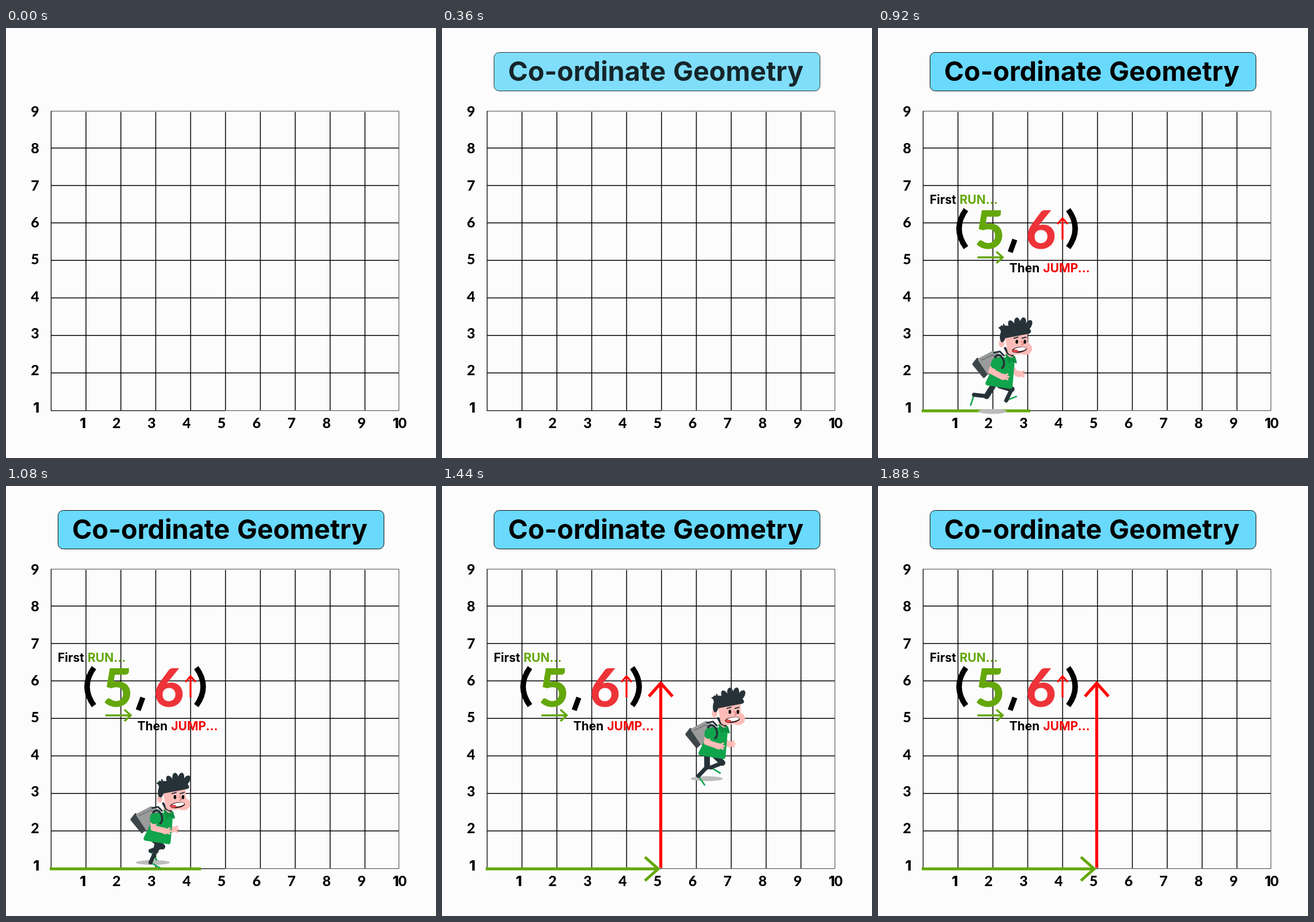
These frames come from a looping animation (748x748 px, 2.6 s). An HTML page with a canvas:

```html
<!DOCTYPE html>
<html lang="en">
<head>
<meta charset="utf-8">
<title>Co-ordinate Geometry</title>
<style>
html, body { margin: 0; width: 100%; height: 100%; overflow: hidden; background: #fcfcfc; }
canvas { display: block; width: 100vw; height: 100vh; }
</style>
</head>
<body>
<canvas id="stage" width="748" height="748"></canvas>
<script>
const SIZE = 748, LOOP = 2600, STEP = 40;
const GREEN = '#64a70b', RED = '#fd0808', DARK = '#263238', SKIN = '#fdbcb8', SHIRT = '#10a44c';
const view = document.getElementById('stage').getContext('2d');
const layer = document.createElement('canvas');
layer.width = layer.height = SIZE;
const boyCtx = layer.getContext('2d');
let c = view;

const { sin, cos, hypot, sqrt, max, min, floor, PI } = Math;
const ramp = (t, from, to) => max(0, min(1, (t - from) / (to - from)));
const ease = (t, from, to) => (1 - cos(PI * ramp(t, from, to))) / 2;

// ---- drawing helpers ----
function trace(pts) {
  c.beginPath();
  pts.forEach(p => c.lineTo(p[0], p[1]));
}

function line(pts, color, width, ends = 'butt') {
  trace(pts);
  c.strokeStyle = color;
  c.lineWidth = width;
  c.lineCap = ends;
  c.lineJoin = ends === 'round' ? 'round' : 'miter';
  c.stroke();
}

// filled polygon with corners rounded outwards by r
function soft(pts, color, r) {
  trace(pts);
  c.closePath();
  c.fillStyle = c.strokeStyle = color;
  c.lineWidth = 2 * r;
  c.lineJoin = 'round';
  c.fill();
  c.stroke();
}

function oval(x, y, rx, ry, color, turn = 0) {
  c.beginPath();
  c.ellipse(x, y, rx, ry, turn, 0, PI * 2);
  c.fillStyle = color;
  c.fill();
}

// shaft plus open head, pointing along (dx, dy)
function arrow(x, y, dx, dy, length, width, back, side, color) {
  const at = (along, across) => [x + dx * along - dy * across, y + dy * along + dx * across];
  line([at(0, 0), at(length - 1, 0)], color, width);
  line([at(length - back, -side), at(length, 0), at(length - back, side)], color, width);
}

function text(str, x, y, size, color = '#000') {
  c.font = `700 ${size}px Inter, sans-serif`;
  c.fillStyle = color;
  c.fillText(str, x, y);
}

// one digit, its ink ending at `right` and centred on y
function digit(ch, right, y, size = 25, color = '#000') {
  c.font = `800 ${size}px ${ch === '1' ? 'Inter' : 'Lato'}, sans-serif`;
  c.fillStyle = color;
  const m = c.measureText(ch);
  c.fillText(ch, right - m.actualBoundingBoxRight,
    y + (m.actualBoundingBoxAscent - m.actualBoundingBoxDescent) / 2);
}

// ---- scene ----
function grid() {
  for (let i = 1; i < 10; i++) {
    const x = 78.5 + i * 60.66;
    line([[x, 146], [x, 665]], '#000', 1.5);
  }
  for (let i = 1; i < 8; i++) {
    const y = 143.4 + i * 65.24;
    line([[79, y], [683, y]], '#000', 1.5);
  }
  line([[78, 144.7], [683.5, 144.7], [683.5, 665.6], [78, 665.6]], '#444', 1);
  line([[78.5, 144.5], [78.5, 665.6], [381, 665.6]], '#111', 1.4);

  for (let n = 1; n <= 9; n++) {
    digit(String(n), 57.3, 724 - n * 64.35);
    digit(String(n), 77.3 + n * 60.9, 687);
  }
  digit('1', 682.5, 687);
  digit('0', 696.5, 687);
}

function title() {
  c.beginPath();
  c.roundRect(90.5, 42.5, 567, 67, 9);
  c.fillStyle = '#69d9fc';
  c.fill();
  c.strokeStyle = '#111';
  c.lineWidth = 1;
  c.stroke();
  text('Co-ordinate', 115, 92, 46.7);
  text('Geometry', 402, 92, 46.7);
}

function bracket(x, bend) {
  c.beginPath();
  c.moveTo(x, 316);
  c.quadraticCurveTo(x + bend, 349, x, 382);
  c.strokeStyle = '#000';
  c.lineWidth = 9.5;
  c.lineCap = 'butt';
  c.stroke();
}

function pair() {
  text('First', 90, 305.5, 21);
  text('RUN...', 142, 305.5, 21, GREEN);
  text('Then', 228.5, 425, 21);
  text('JUMP...', 287.3, 425, 21, '#f30505');
  bracket(153, -24);
  bracket(331, 24);
  digit('5', 217, 350.5, 91, GREEN);
  line([[238, 368], [230, 390]], '#000', 9);
  digit('6', 308, 350.5, 91, '#ee3338');
  arrow(173, 399, 1, 0, 44, 3.5, 11, 10, GREEN);
  arrow(321, 368, 0, -1, 37, 3.3, 10, 9, RED);
}

function wipe(x, y, w, h, draw) {
  c.save();
  c.beginPath();
  c.rect(x, y, w, h);
  c.clip();
  draw();
  c.restore();
}

function arrows(t) {
  const run = 310 * ramp(t, 500, 1168), jump = 330 * ramp(t, 1116, 1275);
  wipe(340, 664 - jump, 80, jump, () => arrow(380.5, 664, 0, -1, 321, 5.3, 23, 20.5, RED));
  wipe(70, 630, run, 70, () => arrow(76, 666, 1, 0, 300, 5, 23, 20.5, GREEN));
}

// ---- runner ----
const ROUTE = [[680, 129], [920, 199], [1240, 329], [1640, 611], [1840, 784]];

// smooth curve through the route's points
function routeX(t) {
  const last = ROUTE.length - 1;
  let i = 0;
  while (i < last - 1 && t >= ROUTE[i + 1][0]) i++;
  const slope = k => {
    const p = ROUTE[max(0, k - 1)], q = ROUTE[min(last, k + 1)];
    return (q[1] - p[1]) / (q[0] - p[0]);
  };
  const [t0, a] = ROUTE[i], [t1, b] = ROUTE[i + 1];
  const s = (t - t0) / (t1 - t0), r = 1 - s;
  return a * r * r * (1 + 2 * s) + b * s * s * (3 - 2 * s)
    + (t1 - t0) * s * r * (slope(i) * r - slope(i + 1) * s);
}

const routeY = t => 656 + 11 * ease(t, 680, 920) - 181 * ease(t, 1020, 1380) + 170 * ease(t, 1380, 1630);

// the ankle follows a loop; the knee is where two equal bones meet
function leg(turn, hx, hy) {
  const bone = 22;
  const ax = -4 + 28 * cos(turn);
  const ay = -17 + 10 * sin(turn) + 5 * cos(turn) - 7 * cos(2 * turn);
  const dx = ax - hx, dy = ay - hy, d = hypot(dx, dy);
  const bend = sqrt(max(0, bone * bone - d * d / 4)) / d;
  const knee = [hx + dx / 2 + dy * bend, hy + dy / 2 - dx * bend];
  const tilt = 0.75 - 1.15 * cos(turn - 0.2);
  line([[ax, ay], [ax + 19 * cos(tilt), ay + 19 * sin(tilt)]], '#1ba858', 2.8, 'round');
  line([[hx, hy], knee], DARK, 10, 'round');
  line([knee, [ax, ay]], DARK, 7, 'round');
}

function hand(x, y) {
  oval(x, y, 6.5, 5.5, SKIN, 0.3);
  for (let a = -0.6; a < 1; a += 0.6)
    line([[x, y], [x + 10 * cos(a), y + 8 * sin(a)]], SKIN, 3.5, 'round');
}

function backpack() {
  soft([[-34, -84], [-27, -93], [-11, -67], [-16, -62]], '#3d4648', 2);
  soft([[-23, -92], [0, -104], [13, -98], [-7, -68]], '#9a9b9b', 3);
  line([[-20, -91], [-1, -100], [9, -94]], '#6c7071', 1.5, 'round');
  line([[2, -104], [12, -106], [19, -99]], DARK, 3, 'round');
}

function torso() {
  line([[28, -106], [30, -94]], SKIN, 14);
  soft([[11, -92], [34, -92], [30, -45], [-9, -51]], SHIRT, 4);
  soft([[23, -100], [31, -92], [28, -87]], '#0d8f42', 1.5);
  soft([[37, -97], [33, -91], [40, -87]], '#0d8f42', 1.5);
}

function hair() {
  soft([[16, -147], [58, -147], [62, -141], [20, -133]], DARK, 4);
  oval(17, -133, 5, 11, DARK, 0.1);
  for (let i = 0; i < 4; i++)
    oval(33 + 9.5 * i, -151 - 5 * sin(i), 5.5, 10, DARK, -0.5 + 0.35 * i);
  for (let i = 0; i < 3; i++)
    line([[18 + 3 * i, -142], [10 + 4 * i, -148 - 3 * i]], DARK, 2.5);
}

function head() {
  line([[21, -112], [26, -103], [34, -99]], DARK, 4, 'round');
  soft([[28, -136], [52, -138], [53, -110], [33, -108]], SKIN, 8);
  oval(56, -111, 12, 11, SKIN);
  oval(15, -120, 5, 6.5, SKIN);
  hair();
  for (const x of [41.5, 55.5]) {
    oval(x, -123, 2.3, 3.6, '#111');
    line([[x - 5, -129], [x + 2, -131]], DARK, 2, 'round');
  }
  line([[49, -124], [53, -119], [50, -117]], '#c9716c', 1.4, 'round');
  oval(46, -109, 13, 5, '#3a1a1c', -0.15);
  oval(47, -110, 11, 3.3, '#fff', -0.15);
  oval(39, -107, 5, 2.3, '#e2474b');
}

function nearArm(swing) {
  const elbow = [4 - 7 * swing, -69 - 3 * swing], wrist = [21 - 7 * swing, -65 + 2 * swing];
  line([[4, -87], elbow, wrist], SKIN, 10, 'round');
  hand(wrist[0] + 3, wrist[1] + 1);
  line([[5, -88], [5 - 2 * swing, -83]], SHIRT, 14, 'round');
  c.beginPath();
  c.ellipse(11, -88, 8, 12, -0.3, -2.2, 1.4);
  c.strokeStyle = DARK;
  c.lineWidth = 3.5;
  c.stroke();
}

function runner(t) {
  const turn = (t - 920) / 640 * PI * 2;
  const swing = cos(turn), hop = cos(2 * turn + 0.5);
  const bx = 4 * swing - 3, by = 4 - 6 * hop + 3 * swing;

  c.save();
  c.translate(routeX(t), routeY(t));
  oval(0, 0, 27.5 - 2.5 * hop, 4.2, '#bcbcbc');

  const hx = 6 + bx / 2, hy = -46 + by / 2;
  leg(turn + PI, hx - 5, hy);
  leg(turn, hx + 6, hy);

  c.translate(bx, by);
  line([[30, -82], [33 + 8 * swing, -67]], SKIN, 8, 'round');
  hand(37 + 8 * swing, -67);
  backpack();
  torso();
  head();
  nearArm(swing);
  c.restore();
}

function faded(alpha, draw) {
  if (alpha <= 0) return;
  c.globalAlpha = alpha;
  draw();
  c.globalAlpha = 1;
}

function render(t) {
  c = view;
  c.fillStyle = '#fcfcfc';
  c.fillRect(0, 0, SIZE, SIZE);
  grid();
  faded(ramp(t, 160, 400), title);
  faded(ramp(t, 400, 640), pair);
  arrows(t);
  if (t > 600 && t < 1880) {
    c = boyCtx;
    c.clearRect(0, 0, SIZE, SIZE);
    runner(t);
    c = view;
    faded(ramp(t, 600, 840), () => c.drawImage(layer, 0, 0));
  }
}

const start = performance.now();
function tick() {
  const t = (performance.now() - start) % LOOP;
  render(floor(t / STEP) * STEP);
  requestAnimationFrame(tick);
}
tick();
</script>
</body>
</html>
```
